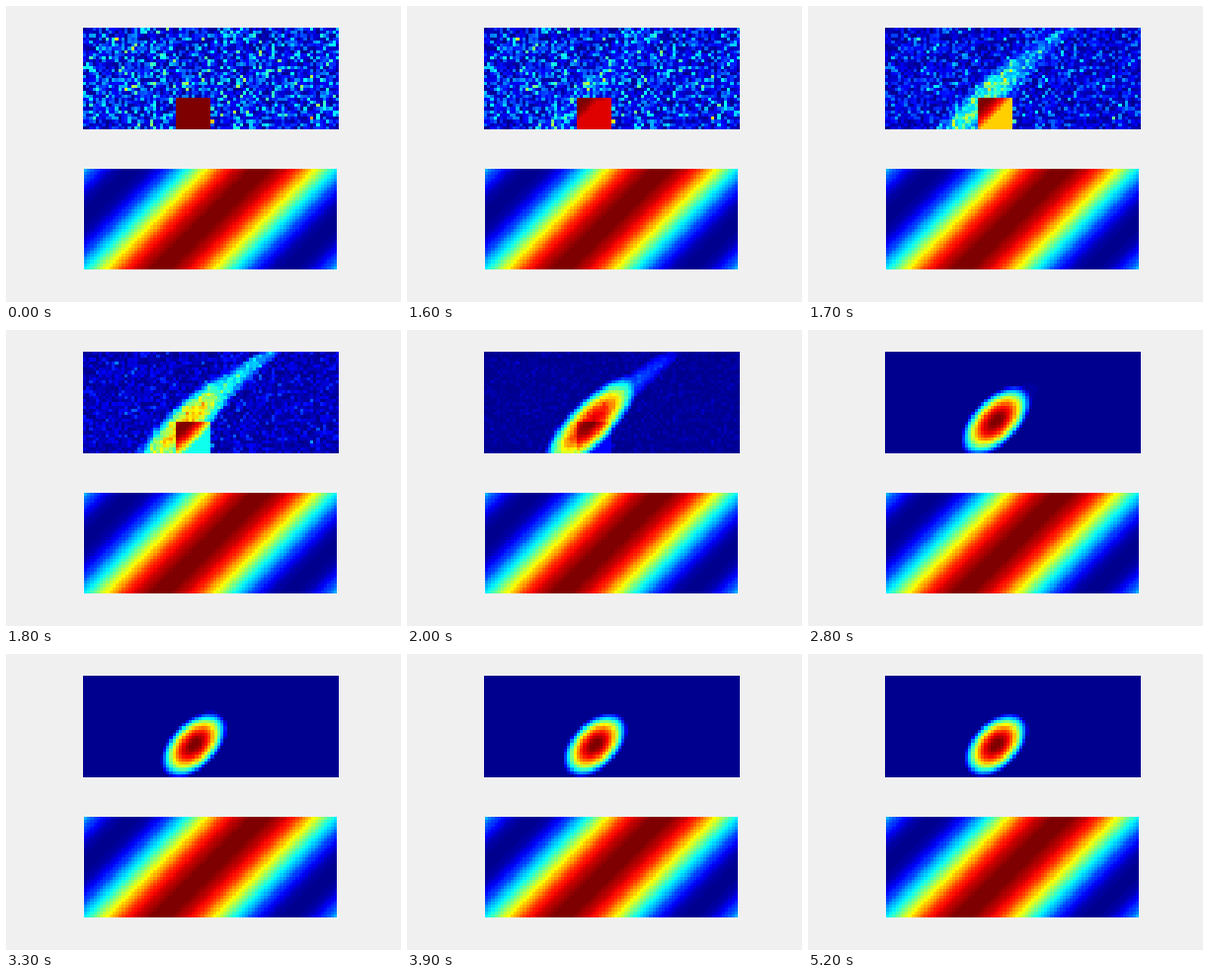
Recreate the animation shown at these times as a matplotlib script. Size 400 by 300 pixels, loop 7600 ms.

```python
import numpy as np
import matplotlib.pyplot as plt
from matplotlib.animation import FuncAnimation
from matplotlib.colors import ListedColormap

W, H, DPI = 400, 300, 100
ROWS, COLS = 32, 80
FRAMES, STEP_MS = 76, 100
FIRST = 15                                   # last frame before the field moves
SETTLING = (34, 36, 38, 39, 42, 45, 52)      # sparse updates near convergence
START_WEIGHT = (1, 0.9, 0.66, 0.38, 0.21, 0.115)

# 64-level jet palette
level = np.arange(1, 65)
ramps = [np.minimum(level - 24, 72 - level),
         np.minimum(level - 8, 56 - level),
         np.minimum(level + 8, 40 - level)]
jet64 = ListedColormap(np.clip(np.array(ramps).T / 16, 0, 1))

row, col = np.mgrid[0:ROWS, 0:COLS] + 0.5
along = ((col - 34.75) - (row - 21.75)) / np.sqrt(2)
across = ((col - 34.75) + (row - 21.75)) / np.sqrt(2)

rng = np.random.default_rng(7)
start = np.clip(np.abs(rng.normal(0, 0.195, (ROWS, COLS))), 0, 0.72)
start[22:32, 29:40] = 1

stripes = np.cos(2 * np.pi * (col + row - (ROWS + COLS) / 2) / 81)


def offset(n):
    """Distance of the young bump from its resting place."""
    return 4 * np.exp(-n / 2.5)


def bump(n):
    """Tilted bump that drifts and shrinks towards its resting shape."""
    a = 12.2 + 22.4 * np.exp(-n / 5.15)
    b = 7.5 - 5 * np.exp(-n / 2)
    s = along + 2.5 * offset(n)
    p = across + offset(n)
    return np.clip(1 - (s / a) ** 2 - (p / b) ** 2, 0, 1)


def tail(n):
    """Bent, tapering streak along the ridge, fading and shortening."""
    if n > 16:
        return np.zeros_like(along)
    fade = 1 if n <= 3 else max(0.62 ** (n - 3), 0.05)
    width = np.clip(6 - 0.12 * along, 1, 6)
    reach = np.clip((max(20, 55 - 4 * n) - along) / 6, 0, 1)
    amp = (0.72 - 0.011 * along) * fade * reach * (along > 0)
    p = across + offset(n) - 0.003 * along ** 2
    return amp * np.clip(1 - (p / width) ** 2, 0, 1)


def field(n):
    if n <= 0:
        return start
    if n < len(START_WEIGHT):
        weight = START_WEIGHT[n]
    else:
        weight = START_WEIGHT[-1] * 0.52 ** (n - len(START_WEIGHT) + 1)
    u = weight * start + (1 - weight) * np.maximum(bump(n), tail(n))
    return u / u.max()


def held(frame):
    """Latest frame at which the field was updated."""
    if frame < SETTLING[0]:
        return frame
    return max(f for f in SETTLING if f <= frame)


def panel(data, left, top, right, bottom, low):
    ax = fig.add_axes([left / W, 1 - bottom / H,
                       (right - left) / W, (bottom - top) / H])
    ax.axis("off")
    return ax.imshow(data, cmap=jet64, vmin=low, vmax=1, aspect="auto",
                     interpolation="nearest")


fig = plt.figure(figsize=(W / DPI, H / DPI), dpi=DPI, facecolor="#f0f0f0")
top_image = panel(start, 78, 22, 336, 125, 0)
panel(stripes, 79, 165, 335, 267, -1)


def update(frame):
    top_image.set_data(field(held(frame) - FIRST))
    return [top_image]


anim = FuncAnimation(fig, update, frames=FRAMES, interval=STEP_MS,
                     repeat=True, repeat_delay=0, blit=False)
plt.show()
```
